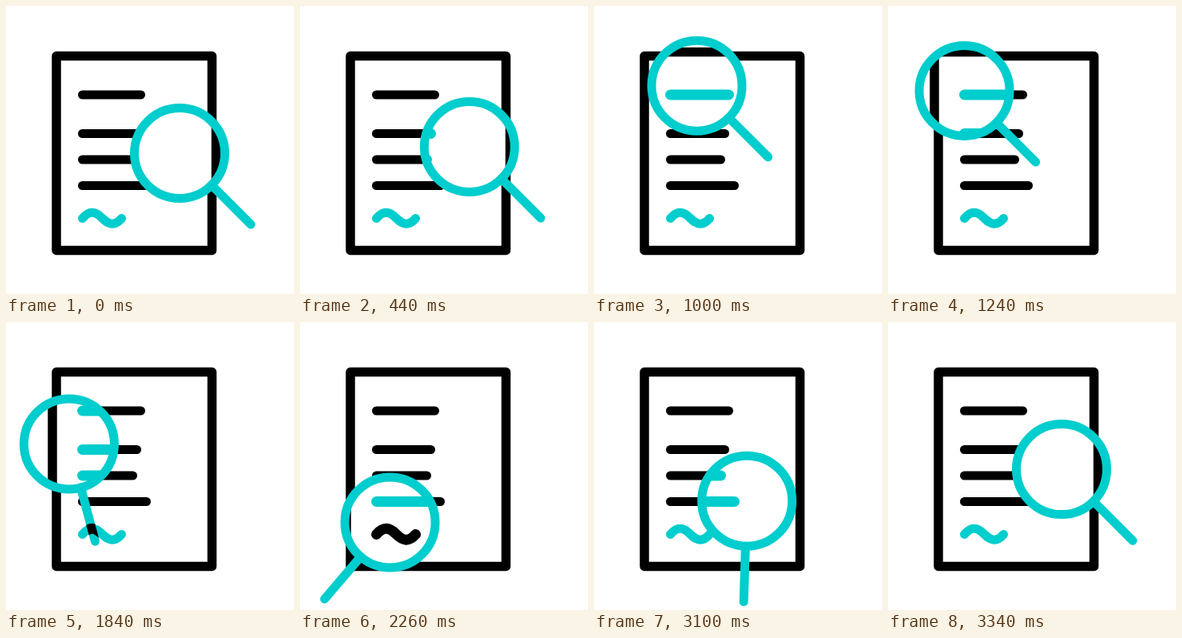
Write an HTML page with a canvas that moves like this. It is 360 px wide and 360 px high and loops after 3620 ms.

```html
<!DOCTYPE html>
<html lang="en">
<head>
<meta charset="utf-8">
<title>Document search</title>
<style>
  html, body { margin: 0; height: 100%; overflow: hidden; background: #fff; }
  canvas { display: block; width: 360px; height: 360px; }
</style>
</head>
<body>
<canvas id="stage" width="360" height="360"></canvas>
<script>
const ctx = document.getElementById('stage').getContext('2d');
const LOOP = 3620, CYAN = '#00cdcd', BLACK = '#000';
const RADIUS = 56.5, REACH = 126;
const LINES = [[111, 168.5], [159.5, 163.5], [192, 158.5], [224.5, 175.5]];
const SQUIGGLE = new Path2D('M95.5 265.5C104 256 111 256 120 265S136 275 144.5 265.5');

// Each move: time span, Bezier path of the lens centre, handle turn (degrees) and its time span
const MOVES = [
  { span: [210, 1245], x: [217, 205, 182.5, 95.5], y: [184, 173, 74, 106], turn: [45, 45], turnSpan: [210, 1245] },
  { span: [1500, 2380], x: [95.5, 57.5, 93.5, 116], y: [106, 137, 227.5, 255], turn: [45, 135], turnSpan: [1500, 2380] },
  { span: [2700, 3350], x: [116, 169.5, 190, 217], y: [255, 271.5, 225, 184], turn: [135, 45], turnSpan: [2865, 3350] }
];

function ease(time, [start, end]) {
  const t = Math.min(1, Math.max(0, (time - start) / (end - start)));
  return t * t * (3 - 2 * t);
}

function bezier([a, b, c, d], s) {
  const r = 1 - s;
  return r * r * r * a + 3 * r * r * s * b + 3 * r * s * s * c + s * s * s * d;
}

function pose(time) {
  const move = MOVES.findLast(m => time >= m.span[0]) || MOVES[0];
  const s = ease(time, move.span);
  const [from, to] = move.turn;
  return {
    x: bezier(move.x, s),
    y: bezier(move.y, s),
    angle: (from + (to - from) * ease(time, move.turnSpan)) * Math.PI / 180
  };
}

function stroke(color, width, path) {
  ctx.strokeStyle = color;
  ctx.lineWidth = width;
  ctx.stroke(path);
}

function segment(x1, y1, x2, y2) {
  const path = new Path2D();
  path.moveTo(x1, y1);
  path.lineTo(x2, y2);
  return path;
}

function drawPage(grow, width, lineColor, squiggleColor) {
  const frame = new Path2D();
  frame.rect(63 - grow, 62.5 - grow, 194.5 + 2 * grow, 243 + 2 * grow);
  stroke(BLACK, 11.5, frame);
  for (const [y, end] of LINES) stroke(lineColor, width, segment(95.5, y, end, y));
  stroke(squiggleColor, width, SQUIGGLE);
}

function drawGlass({ x, y, angle }) {
  const dx = Math.cos(angle), dy = Math.sin(angle);
  const startX = x + dx * RADIUS, startY = y + dy * RADIUS;
  const tipX = x + dx * REACH, tipY = y + dy * REACH;
  const ring = new Path2D();
  ring.arc(x, y, RADIUS, 0, 2 * Math.PI);

  // Inside the lens the page is enlarged and its colours are swapped
  ctx.save();
  ctx.clip(ring);
  ctx.fillStyle = '#fff';
  ctx.fill(ring);
  drawPage(5, 13, CYAN, BLACK);
  ctx.restore();

  stroke(CYAN, 11, segment(startX, startY, tipX, tipY));

  // The swapped squiggle also shows through the handle
  const handle = new Path2D();
  handle.arc(startX, startY, 5.5, angle + Math.PI / 2, angle - Math.PI / 2);
  handle.arc(tipX, tipY, 5.5, angle - Math.PI / 2, angle + Math.PI / 2);
  ctx.save();
  ctx.clip(handle);
  stroke(BLACK, 13, SQUIGGLE);
  ctx.restore();

  stroke(CYAN, 11, ring);
}

function render() {
  ctx.fillStyle = '#fff';
  ctx.fillRect(0, 0, 360, 360);
  drawPage(0, 11, BLACK, CYAN);
  drawGlass(pose((performance.now() - began) % LOOP));
  requestAnimationFrame(render);
}

ctx.lineCap = ctx.lineJoin = 'round';
const began = performance.now();
render();
</script>
</body>
</html>
```
